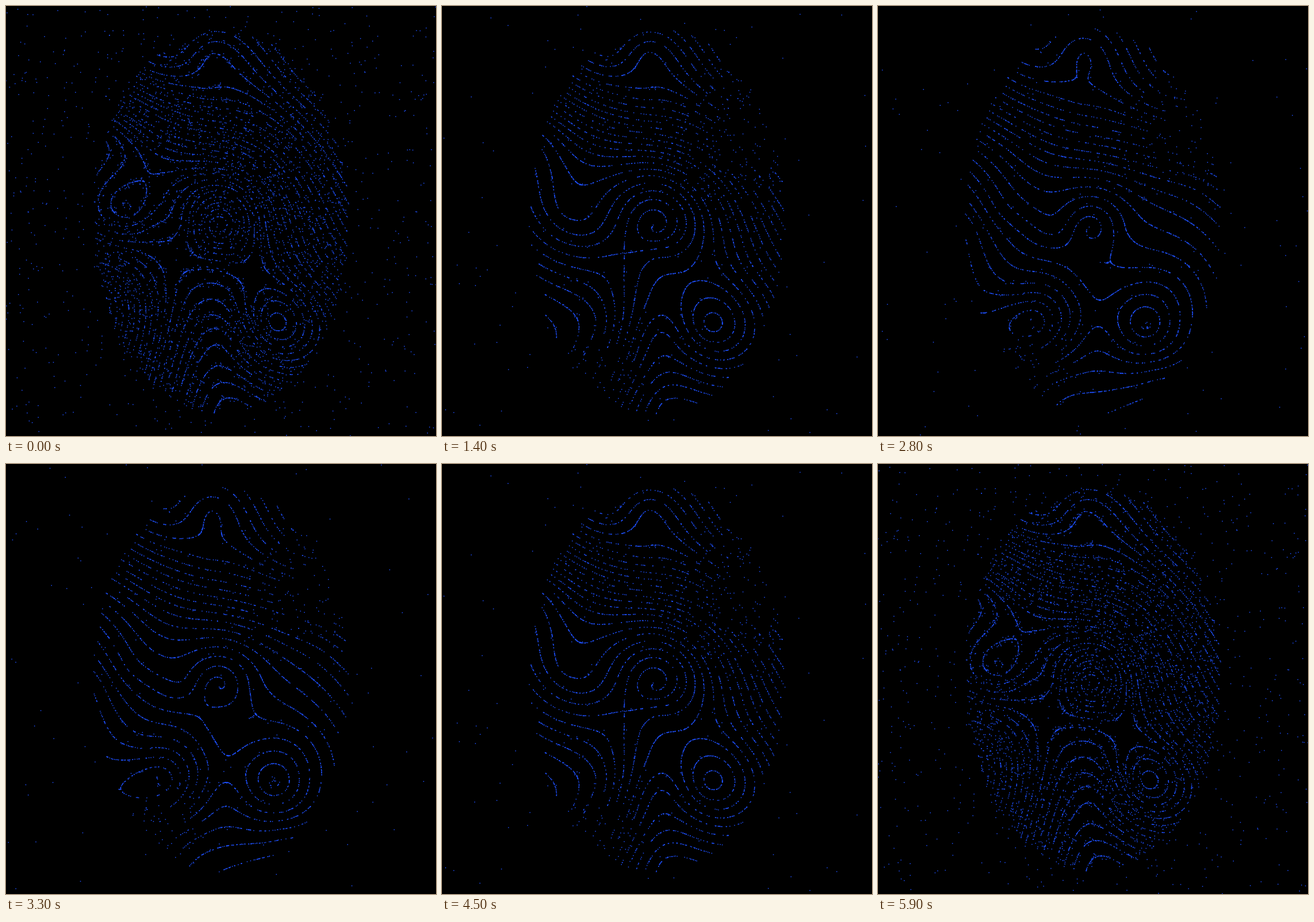
These frames come from a looping animation (748x748 px, 6000 ms). An HTML page with a canvas:

```html
<!DOCTYPE html>
<html>
<head>
<meta charset="utf-8">
<style>
  html, body { margin: 0; height: 100%; overflow: hidden; background: #000; }
  canvas { display: block; }
</style>
</head>
<body>
<canvas id="stage" width="748" height="748"></canvas>
<script>
const SIZE = 748, MID = SIZE / 2, RX = 223, RY = 336, TAU = Math.PI * 2;
const ctx = document.getElementById('stage').getContext('2d');

// x, y, then the ridge height there at the start, middle and end of the drift
const anchors = [
  [370, 386, 0.5, 0.5, -4.5], [312, 382, -5, -2, -7], [432, 390, -5, -2.5, -7],
  [370, 295, -7, -4.3, -9.5], [370, 436, -4.2, -2.6, -5.5], [350, 150, -20, -17, -18],
  [358, 85, -21.2, -18.1, -18.2], [295, 82, -23.5, -20.5, -20], [500, 120, -25, -23, -23],
  [555, 300, -19, -14, -12], [540, 450, -12, -8, -7], [240, 107, -21.3, -18, -18.7],
  [172, 230, -6.5, -5, -8.5], [222, 255, -8, -6.3, -9], [212, 355, -9, -4.7, -5.7],
  [255, 385, -6.4, -4, -6], [155, 385, -6, -1.6, -1.9], [180, 505, 4, 2.5, -1.3],
  [240, 490, -2, 0.8, -2.3], [300, 450, -5.3, -1.3, -4.4], [275, 550, -4.8, 1, 1],
  [385, 500, -7, -4.2, -5], [383, 575, -10, -6, -5.2], [385, 690, -14, -9.8, -8.2],
  [300, 645, -9, -3, -6], [440, 465, -5.5, -4, -5.6], [467, 555, -2.5, -1.5, -2],
  [520, 545, -5, -3.5, -4.6], [480, 645, -9.3, -6.8, -7.5]
];
const core = { x: 370, y: 384 };
// areas where the ridges dissolve: x, y, radius
const loose = [[545, 220, 95], [270, 630, 65]];

const mix = (a, b, u) => a + (b - a) * u;

function randomFrom(seed) {
  return () => {
    seed = (seed + 0x6D2B79F5) | 0;
    let t = Math.imul(seed ^ (seed >>> 15), 1 | seed);
    t = (t + Math.imul(t ^ (t >>> 7), 61 | t)) ^ t;
    return ((t ^ (t >>> 14)) >>> 0) / 4294967296;
  };
}

const swirl = (x, y) => -Math.atan2(y - core.y, x - core.x) / TAU;
const kernel = r2 => r2 ? r2 * Math.log(r2) : 0;
const nodes = anchors.map(([x, y]) => [(x - MID) / 100, (y - MID) / 100]);

// Thin-plate spline weights for all three poses
function solveWeights() {
  const n = nodes.length, m = n + 3;
  const rows = nodes.map(([x, y], i) => [
    ...nodes.map(([a, b]) => kernel((x - a) ** 2 + (y - b) ** 2)),
    1, x, y, ...anchors[i].slice(2)
  ]);
  for (const pick of [() => 1, p => p[0], p => p[1]])
    rows.push([...nodes.map(pick), 0, 0, 0, 0, 0, 0]);
  for (let c = 0; c < m; c++) {
    let best = c;
    for (let r = c; r < m; r++) if (Math.abs(rows[r][c]) > Math.abs(rows[best][c])) best = r;
    [rows[c], rows[best]] = [rows[best], rows[c]];
    for (let r = 0; r < m; r++) {
      if (r === c) continue;
      const f = rows[r][c] / rows[c][c];
      for (let j = c; j < m + 3; j++) rows[r][j] -= f * rows[c][j];
    }
  }
  return [0, 1, 2].map(p => rows.map((row, i) => row[m + p] / row[i]));
}
const poses = solveWeights();

function weightsAt(step) {
  const [from, to, u] = step < 14
    ? [poses[0], poses[1], (step / 14) ** 3]
    : [poses[1], poses[2], (step - 14) / 14];
  return from.map((w, i) => mix(w, to[i], u));
}

// Height and gradient of the ridge field
function field(w, px, py) {
  const n = nodes.length, x = (px - MID) / 100, y = (py - MID) / 100;
  let v = w[n] + w[n + 1] * x + w[n + 2] * y, gx = w[n + 1], gy = w[n + 2];
  for (let i = 0; i < n; i++) {
    const dx = x - nodes[i][0], dy = y - nodes[i][1], r2 = dx * dx + dy * dy + 1e-9;
    const log = Math.log(r2), slope = 2 * w[i] * (log + 1);
    v += w[i] * r2 * log;
    gx += slope * dx;
    gy += slope * dy;
  }
  const cx = px - core.x, cy = py - core.y, c2 = (cx * cx + cy * cy + 4) * TAU;
  return [v + swirl(px, py), gx / 100 + cy / c2, gy / 100 - cx / c2];
}

// Pull a point onto the nearest ridge
function settle(w, x, y) {
  let level = null;
  for (let i = 0; i < 4; i++) {
    const [v, gx, gy] = field(w, x, y);
    if (level === null) level = Math.round(v);
    let miss = v - level;
    miss -= Math.round(miss);
    const g2 = gx * gx + gy * gy + 1e-5;
    const pull = Math.min(1, 12 * Math.sqrt(g2) / (Math.abs(miss) + 1e-9));
    x -= pull * miss * gx / g2;
    y -= pull * miss * gy / g2;
  }
  return [x, y];
}

const inside = (x, y) => ((x - MID) / RX) ** 2 + ((y - MID) / RY) ** 2 < 1;

const rand = randomFrom(7);
const grains = Array.from({ length: 6500 }, () => {
  const a = rand() * TAU, r = Math.sqrt(rand());
  return {
    x: MID + RX * r * Math.cos(a), y: MID + RY * r * Math.sin(a),
    luck: rand(), stray: rand(), jx: rand() - 0.5, jy: rand() - 0.5
  };
});

function draw(step) {
  const w = weightsAt(step), fresh = Math.exp(-step / 1.5);
  const calm = Math.min(1, step / 12);
  const count = mix(mix(4900, 4000, step / 29), grains.length, fresh);
  const dot = (x, y) => ctx.fillRect(x - 0.75, y - 0.75, 1.5, 1.5);
  ctx.fillStyle = '#000';
  ctx.fillRect(0, 0, SIZE, SIZE);
  ctx.fillStyle = '#1f51ff';

  for (const g of grains.slice(0, count)) {
    let haze = 0;
    for (const [x, y, r] of loose)
      haze += calm * Math.exp(-(((g.x - x) ** 2 + (g.y - y) ** 2) / (r * r)));
    if (g.luck < haze * 0.75) continue;
    let [x, y] = settle(w, g.x, g.y);
    const spread = g.stray < 0.03 + 0.3 * fresh + haze * 0.5 ? 14 : 0.6;
    x += g.jx * spread;
    y += g.jy * spread;
    if (inside(x, y)) dot(x, y);
  }

  const sky = randomFrom(100 + step);
  for (let i = 0; i < 120 + 800 * fresh; i++) {
    const x = sky() * SIZE, y = sky() * SIZE;
    if (!inside(x, y)) dot(x, y);
  }
}

let shown = -1;
function tick() {
  const beat = Math.floor(performance.now() / 100) % 60;
  const step = beat < 30 ? beat : 59 - beat;
  if (step !== shown) draw(shown = step);
  requestAnimationFrame(tick);
}
tick();
</script>
</body>
</html>
```
